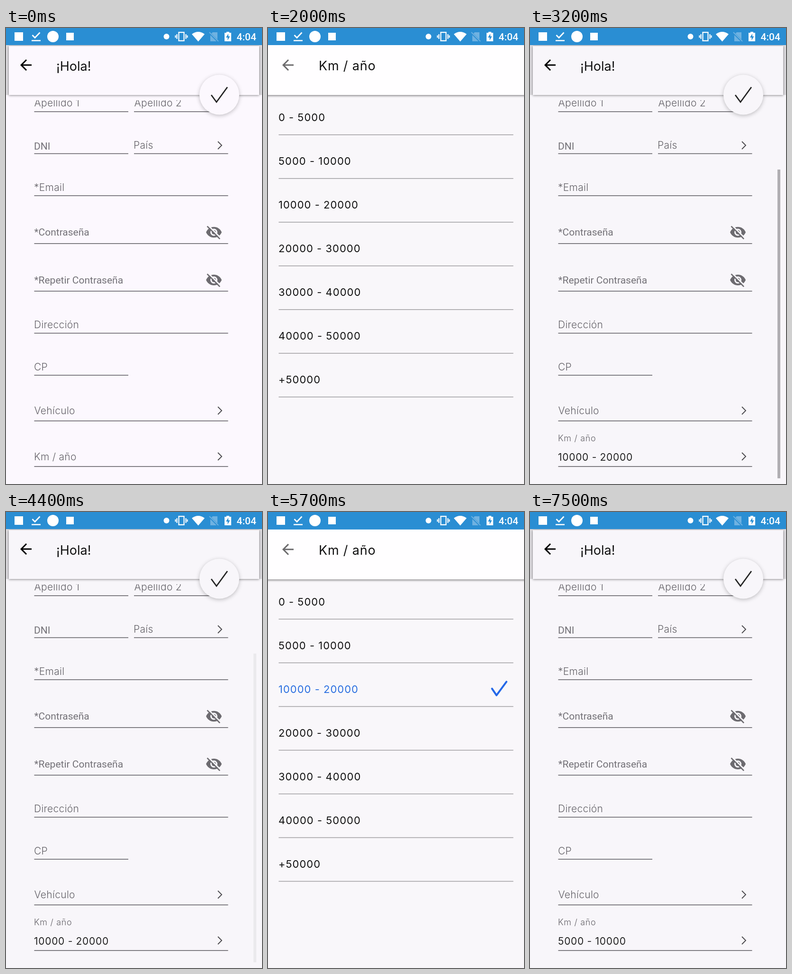
An HTML page for the animation above (7600 ms loop, 540 by 960 pixels).

```html
<!DOCTYPE html>
<html lang="es">
<head>
<meta charset="utf-8">
<title>Formulario</title>
<style>
  html, body { margin: 0; width: 100%; height: 100%; overflow: hidden; background: #f8f6fa; }
  svg { display: block; width: 540px; height: 960px; --bg: #f8f6fa; }
  text { font-family: Inter, "Open Sans", sans-serif; white-space: pre; }
  .label { font-size: 21px; font-weight: 300; fill: #656369; letter-spacing: .3px; }
  .plain { font-family: Roboto, sans-serif; font-size: 21px; fill: #737177; }
  .small { font-size: 18px; font-weight: 300; fill: #656369; letter-spacing: .7px; }
  .value { font-size: 21px; fill: #222; letter-spacing: .7px; }
  .title { font-size: 27px; fill: #111; }
  .item { font-size: 22px; fill: #111; letter-spacing: 1px; }
  .item.on { fill: #2a6fe0; }
  .clock { font-family: Roboto, sans-serif; font-size: 21px; font-weight: 500; fill: #fff; }
  .surface { fill: var(--bg); }
  .stroke { fill: none; }
  .card { filter: drop-shadow(0 1px 2.5px rgba(0, 0, 0, .45)); }
  .fab { filter: drop-shadow(0 2px 4px rgba(0, 0, 0, .24)); }
  .bar { filter: drop-shadow(0 2px 2px rgba(0, 0, 0, .45)); }
</style>
</head>
<body>
<svg id="stage" viewBox="0 0 540 960">
  <defs>
    <clipPath id="scrollArea"><rect y="152" width="540" height="808"/></clipPath>
    <path id="back" d="M20 11H7.83l5.59-5.59L12 4l-8 8 8 8 1.41-1.41L7.83 13H20z"
      transform="translate(24 60) scale(1.5)"/>
    <path id="chevron" class="stroke" d="M-4 -8L4 0L-4 8" stroke="#48464b" stroke-width="1.8"/>
    <g id="eye" transform="scale(1.5)">
      <path d="M1 12C2.73 7.61 7 4.5 12 4.5s9.27 3.11 11 7.5c-1.73 4.39-6 7.5-11 7.5S2.73 16.39 1 12z" fill="#6d6b70"/>
      <circle class="stroke" cx="12" cy="12" r="4" stroke="var(--bg)" stroke-width="2"/>
      <path d="M3.4 1.8L21.8 20.2" stroke="var(--bg)" stroke-width="1.8"/>
      <path d="M2.6 3.6L20.4 21.4" stroke="#6d6b70" stroke-width="1.8"/>
    </g>
  </defs>

  <g id="form">
    <rect class="surface" width="540" height="960"/>
    <g id="fields" clip-path="url(#scrollArea)"></g>
    <rect id="scrollbar" x="522" y="298" width="6" height="650" fill="#b1afb3"/>
    <rect y="36" width="540" height="105" fill="#dddbdf"/>
    <rect class="surface card" x="6" y="38" width="528" height="103"/>
    <use href="#back"/>
    <text class="title" x="106" y="89.500">¡Hola!</text>
    <circle class="surface fab" cx="450" cy="140.500" r="42"/>
    <path class="stroke" d="M433 141L444 156L467 124.500" stroke="#242424" stroke-width="2.8"/>
  </g>

  <g id="list">
    <rect width="540" height="960" fill="#f9f7fa"/>
    <rect class="bar" x="-6" y="30" width="552" height="111" fill="#fffeff"/>
    <rect width="540" height="36" fill="#2a8ed3"/>
    <use href="#back" fill="#6c6b6d"/>
    <text class="title" x="107" y="89" letter-spacing=".8">Km / año</text>
    <g id="items"></g>
    <path id="tick" class="stroke" d="M472.500 371L482 385L503 356.500" stroke="#2468e8"
      stroke-width="4" stroke-linecap="round" stroke-linejoin="round"/>
  </g>

  <g id="status" fill="#fff">
    <rect width="540" height="36" fill="#2a8ed3"/>
    <rect x="18" y="9" width="18" height="18"/>
    <path class="stroke" d="M55.500 15L61 20.500L71.500 9.500M54 26.500H73" stroke="#fff" stroke-width="2.7"/>
    <circle cx="99" cy="18" r="12"/>
    <rect x="127" y="10" width="16" height="16"/>
    <circle cx="338.500" cy="18" r="6"/>
    <path class="stroke" d="M364.500 9.200H375.500V26.800H364.500zM360.500 13V23M357.500 15.500V20.500M379.500 13V23M382.500 15.500V20.500"
      stroke="#fff" stroke-width="2.2"/>
    <path d="M392 13Q405.500 3 419 13L405.500 28.500z"/>
    <g opacity=".32">
      <path d="M436 9H446V28H431V14z"/>
      <path d="M429 10L447 28" stroke="#2a8ed3" stroke-width="4"/>
      <path d="M429 9L448 28" stroke="#fff" stroke-width="1.8"/>
    </g>
    <path d="M465 8H471V10H475V28H461V10H465z"/>
    <path d="M469 12L464 20H467.500V26L472.500 17.500H469z" fill="#2a8ed3"/>
    <text class="clock" x="486.500" y="25.500">4:04</text>
  </g>
</svg>

<script>
const $ = id => document.getElementById(id);
const NS = "http://www.w3.org/2000/svg";

function add(parent, tag, attrs, text) {
  const el = document.createElementNS(NS, tag);
  for (const key in attrs) el.setAttribute(key, attrs[key]);
  if (text) el.textContent = text;
  parent.append(el);
  return el;
}

const fields = $("fields"), items = $("items");
const write = (cls, x, y, text) => add(fields, "text", { class: cls, x, y }, text);
const rule = (parent, x1, x2, y, stroke) =>
  add(parent, "path", { d: `M${x1} ${y}H${x2}`, stroke, "stroke-width": 1.5 });

// Form rows: style, x, baseline, text
[
  ["label", 59.5, 165, "Apellido 1"],
  ["label", 270.5, 165, "Apellido 2"],
  ["plain", 59, 256, "DNI"],
  ["label", 269, 254, "País"],
  ["label", 59, 342.5, "*Email"],
  ["plain", 59.5, 437, "*Contraseña"],
  ["plain", 59.5, 537.5, "*Repetir Contraseña"],
  ["label", 59, 632, "Dirección"],
  ["label", 59, 720.5, "CP"],
  ["label", 59.5, 813, "Vehículo"]
].forEach(row => write(...row));

const emptyLabel = write("label", 59, 909.5, "Km / año");
const floatLabel = write("small", 59, 869.5, "Km / año");
const value = write("value", 59, 911, "");

for (const y of [353, 453.7, 554, 642.6, 827.2, 923.2]) rule(fields, 59.5, 468.5, y, "#5d5b60");
for (const y of [176.3, 264.6]) {
  rule(fields, 59.5, 258, y, "#5d5b60");
  rule(fields, 270, 468.5, y, "#5d5b60");
}
rule(fields, 59.5, 258, 731, "#5d5b60");
for (const y of [247, 805.5, 902]) add(fields, "use", { href: "#chevron", x: 451, y });
for (const y of [412, 512.5]) add(fields, "use", { href: "#eye", x: 420.5, y });

const ranges = ["0 - 5000", "5000 - 10000", "10000 - 20000", "20000 - 30000",
  "30000 - 40000", "40000 - 50000", "+50000"];
const rows = ranges.map((text, i) => {
  rule(items, 22.5, 517.5, 224.7 + i * 92, "#9f9ea1");
  return add(items, "text", { class: "item", x: 22, y: 196 + i * 92 }, text);
});

const LOOP = 7600, STEP = 100, SHIFT = 78;
const visits = [{ open: 1582, close: 2850 }, { open: 4482, close: 5620 }];
const unit = v => Math.min(1, Math.max(0, v));

// Opacity and offset of the list page at time t
function listPose(t) {
  const visit = visits.find(v => t >= v.open && t < v.close + 250);
  if (!visit) return { alpha: 0, y: 0 };
  if (t < visit.close) {
    const age = t - visit.open;
    return { alpha: 1 - (1 - unit(age / 200)) ** 4, y: SHIFT * (1 - unit(age / 350)) ** 5 };
  }
  const age = t - visit.close;
  return { alpha: 1 - unit((age - 100) / 150), y: SHIFT * unit(age / 250) ** 4 };
}

function scrollAlpha(t) {
  if (t < 2800) return 0;
  return 1 - unit((t - (t < 5000 ? 4170 : 7170)) / 280);
}

function draw(t) {
  const { alpha, y } = listPose(t);
  $("list").setAttribute("opacity", alpha);
  $("list").setAttribute("transform", `translate(0 ${y})`);

  const second = t >= 4000;
  rows[2].classList.toggle("on", second);
  $("tick").setAttribute("opacity", second ? 1 : 0);

  const filled = t >= 2000;
  emptyLabel.setAttribute("opacity", filled ? 0 : 1);
  floatLabel.setAttribute("opacity", filled ? 1 : 0);
  value.textContent = !filled ? "" : t < 5000 ? ranges[2] : ranges[1];

  $("scrollbar").setAttribute("opacity", scrollAlpha(t));
  $("stage").style.setProperty("--bg", t < 1300 ? "#fcf8fe" : "#f8f6fa");
}

const start = performance.now();
function tick() {
  const t = (performance.now() - start) % LOOP;
  draw(Math.floor(t / STEP) * STEP);
  requestAnimationFrame(tick);
}
tick();
</script>
</body>
</html>
```
